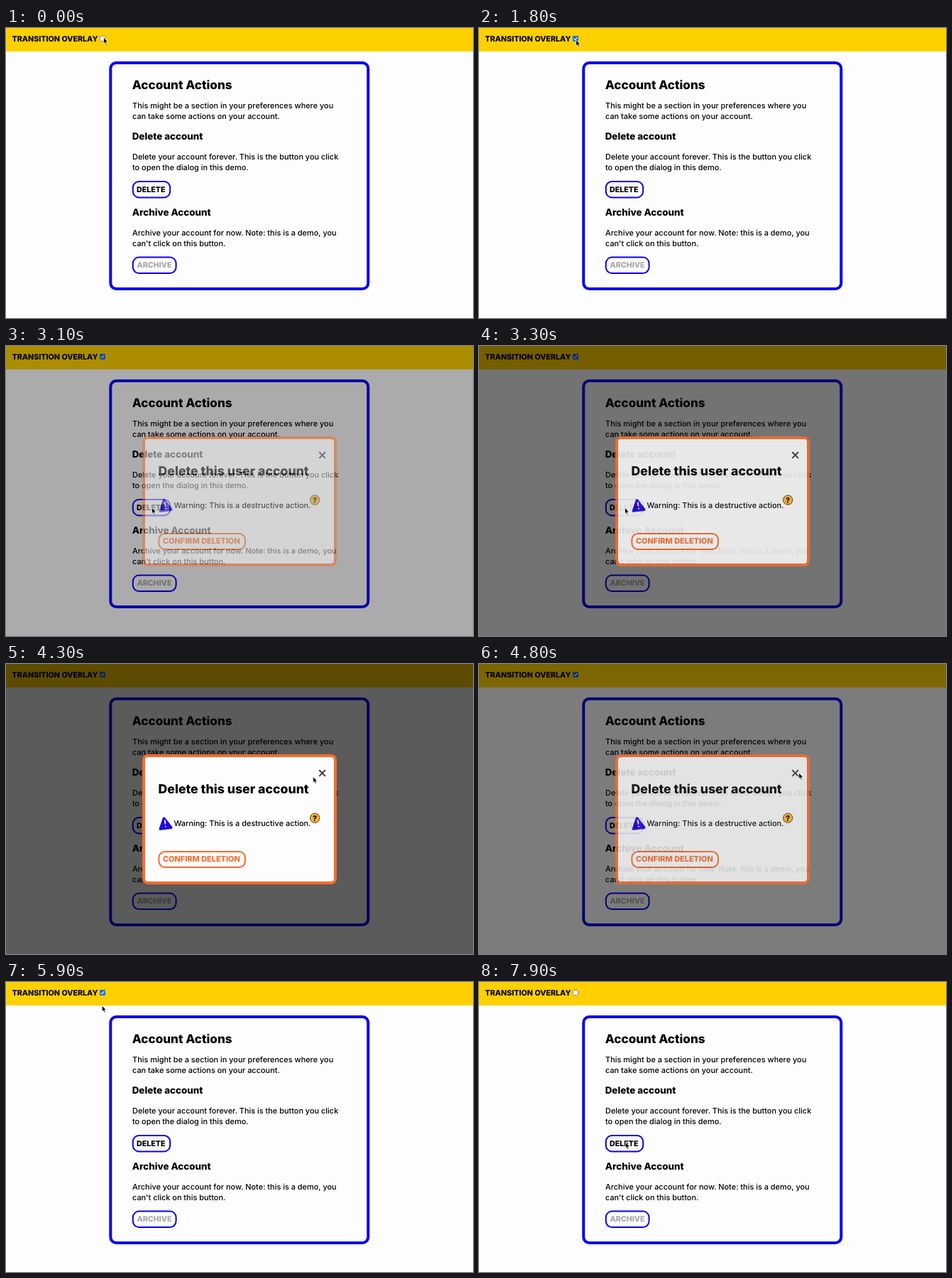
An HTML page for the animation above (8 s loop, 658 by 408 pixels).

```html
<!DOCTYPE html>
<html lang="en">
<head>
<meta charset="utf-8">
<title>Transition overlay</title>
<style>
  html, body { margin: 0; width: 100%; height: 100%; overflow: hidden; background: #fdfdfd; }
  svg { display: block; width: 658px; height: 408px; }
  text { font: 500 10.93px Inter, "Open Sans", sans-serif; fill: #000; text-rendering: geometricPrecision; }
  .h1 { font-size: 17.1px; font-weight: 800; }
  .h2 { font-size: 13.4px; font-weight: 800; }
  .caps { font-size: 10.7px; font-weight: 800; }
  .title { font-size: 17.7px; font-weight: 800; }
  .line { fill: none; stroke: #0a00f2; stroke-width: 2; }
  .off { fill: #a8a6aa; }
  .orange { stroke: #f96b2b; }
</style>
</head>
<body>
<svg viewBox="0 0 658 408">
  <rect width="658" height="408" fill="#fdfdfd"/>
  <rect width="658" height="33" fill="#ffd000"/>
  <text class="caps" x="8.5" y="19">TRANSITION OVERLAY</text>
  <rect x="132.5" y="11.5" width="7" height="7" rx="1.2" fill="#fff" stroke="#767676" stroke-width=".8"/>
  <g id="check">
    <rect x="132" y="11" width="8" height="8" rx="1.4" fill="#1a6fe8"/>
    <path d="M133.7 15.1 l1.7 1.7 l3 -3.7" fill="none" stroke="#fff" stroke-width="1.1"/>
  </g>

  <rect class="line" x="147.3" y="49" width="363" height="318" rx="8" style="stroke-width:4"/>
  <text class="h1" x="177.7" y="86">Account Actions</text>
  <text x="178" y="113">This might be a section in your preferences where you</text>
  <text x="178" y="128">can take some actions on your account.</text>
  <text class="h2" x="177.7" y="157.2">Delete account</text>
  <text x="178" y="185">Delete your account forever. This is the button you click</text>
  <text x="178" y="200">to open the dialog in this demo.</text>
  <rect class="line" x="178.8" y="216" width="52.4" height="22.4" rx="8.5"/>
  <text class="caps" x="184" y="230.7">DELETE</text>
  <text class="h2" x="177.7" y="264">Archive Account</text>
  <text x="178" y="292">Archive your account for now. Note: this is a demo, you</text>
  <text x="178" y="307">can't click on this button.</text>
  <rect class="line" x="178.8" y="322.6" width="60.8" height="22.4" rx="8.5"/>
  <text class="caps off" x="184.5" y="337.3">ARCHIVE</text>

  <rect id="shade" width="658" height="408"/>

  <g id="dialog">
    <rect class="line orange" x="194" y="129" width="270" height="179" rx="6" style="stroke-width:4;fill:#fdfdfd"/>
    <path d="M441.3 149.3 l8.6 8.6 m0 -8.6 l-8.6 8.6" stroke="#3c3c3c" stroke-width="2"/>
    <text class="title" x="214.5" y="181.5">Delete this user account</text>
    <path d="M222.6 217.2 L217.4 232 L232.8 230.2 Z" fill="#2008e0" stroke="#2008e0" stroke-width="3.6" stroke-linejoin="round"/>
    <path d="M223.7 219.6 l.8 5.8 m.35 2.4 l.2 1.5" stroke="#fff" stroke-width="1.7"/>
    <text x="236.5" y="227.5">Warning: This is a destructive action.</text>
    <circle cx="435.2" cy="216.7" r="6.7" fill="#ffb726" stroke="#40300c" stroke-width=".9"/>
    <text class="caps" x="435.2" y="220.6" text-anchor="middle">?</text>
    <rect class="line orange" x="215.4" y="264" width="121.6" height="22" rx="8.5"/>
    <text class="caps" x="221" y="278.3" style="fill:#f96b2b;font-size:10.9px">CONFIRM DELETION</text>
  </g>

  <path id="cursor" d="M0 0 V8.4 L1.9 6.7 L3.2 9.7 L4.7 9.1 L3.4 6.1 H6 Z" fill="#000" stroke="#fff" stroke-width=".7"/>
</svg>
<script>
  const LOOP = 8000, SHADE = 0.64;
  const OPEN = 2650, OPEN_MS = 890, CLOSE = 4540, CLOSE_MS = 840;
  const CHECK_ON = 1350, CHECK_OFF = 6550;

  // time, x, y of the pointer tip
  const path = [
    [0, 137.5, 13.5], [750, 137.5, 13.5], [1100, 136, 14.5], [1750, 136, 14.5],
    [2600, 205.5, 227.5], [3550, 205.5, 227.5], [4450, 450.7, 153.2], [5500, 450.7, 153.2],
    [5900, 135.3, 33.3], [6400, 136.5, 14], [7150, 136.5, 14], [7900, 206.5, 225.5], [LOOP, 206.5, 225.5]
  ];

  const el = id => document.getElementById(id);
  const check = el('check'), shade = el('shade'), dialog = el('dialog'), cursor = el('cursor');
  const clamp = v => Math.min(1, Math.max(0, v));
  const smooth = v => v * v * (3 - 2 * v);

  // cubic-bezier(.42, 0, .58, 1)
  function easeInOut(x) {
    let lo = 0, hi = 1;
    for (let i = 0; i < 20; i++) {
      const s = (lo + hi) / 2, r = 1 - s;
      const bx = 1.26 * r * r * s + 1.74 * r * s * s + s * s * s;
      if (bx < x) lo = s; else hi = s;
    }
    return smooth((lo + hi) / 2);
  }

  const ramp = (t, start, ms) => {
    const x = clamp((t - start) / ms);
    return x === 0 || x === 1 ? x : easeInOut(x);
  };

  function pointer(t) {
    const i = path.findIndex(p => p[0] > t);
    const [t0, x0, y0] = path[i - 1], [t1, x1, y1] = path[i];
    const k = smooth((t - t0) / (t1 - t0));
    return [x0 + (x1 - x0) * k, y0 + (y1 - y0) * k];
  }

  function draw(now) {
    const t = now % LOOP;
    const shown = ramp(t, OPEN, OPEN_MS) - ramp(t, CLOSE, CLOSE_MS);
    shade.setAttribute('opacity', SHADE * shown);
    dialog.setAttribute('opacity', shown);
    check.setAttribute('opacity', t >= CHECK_ON && t < CHECK_OFF ? 1 : 0);
    cursor.setAttribute('transform', `translate(${pointer(t)})`);
  }

  const start = performance.now();
  function tick() {
    draw(performance.now() - start);
    requestAnimationFrame(tick);
  }
  tick();
</script>
</body>
</html>
```
